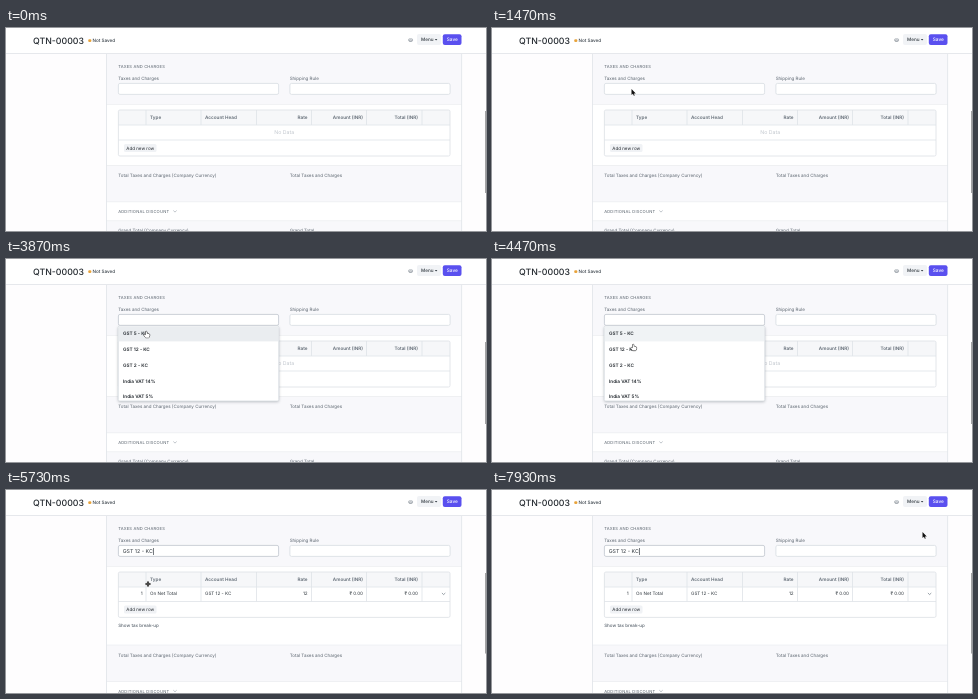
Animation, 480 px wide and 203 px high, one loop 8000 ms. Source, as an HTML page with a canvas:

```html
<!DOCTYPE html>
<html lang="en">
<head>
<meta charset="utf-8">
<title>Quotation taxes</title>
<style>
  html, body { margin: 0; width: 100%; height: 100%; overflow: hidden; background: #fff; }
  canvas { display: block; width: 480px; height: 203px; }
</style>
</head>
<body>
<canvas id="stage"></canvas>
<script>
const W = 480, H = 203, LOOP = 8000, STEP = 1000 / 15;
const canvas = document.getElementById('stage');
const ctx = canvas.getContext('2d');
const dpr = window.devicePixelRatio || 1;
canvas.width = W * dpr;
canvas.height = H * dpr;

const INK = '#20262c', LABEL = '#59636d', LINE = '#e3e6ea', SHADE = '#f8f8fb';
const COLUMNS = [140, 195, 250.5, 305.5, 360.5, 416];
const OPTIONS = ['GST 5 - KC', 'GST 12 - KC', 'GST 2 - KC', 'India VAT 14%', 'India VAT 5%'];

// Times in ms
const FOCUS = 2465, OPEN = 3065, HOVER = 4400, PICK = 5195, FILL = 5260, ROW = 5730;

// Pointer path: time, x, y of the hot spot
const PATH = [
  [65, 446, 11], [265, 437.5, 11.5], [600, 437.5, 11.5], [1465, 139.5, 61],
  [3535, 139.5, 61], [4200, 141, 83.5], [4400, 141, 83.5], [4665, 142, 94],
  [6135, 142, 94], [6600, 198, 106], [7000, 256, 110.5], [7270, 312, 113],
  [7600, 385, 86], [7865, 426.5, 46], [7930, 430.5, 42]
];
// Stretches that ease in and out, by index of their start
const EASED = [0, 2, 4, 6];

function rect(x, y, w, h, fill) {
  ctx.fillStyle = fill;
  ctx.fillRect(x, y, w, h);
}

function box(x, y, w, h, r, fill, stroke) {
  ctx.beginPath();
  ctx.roundRect(x, y, w, h, r);
  if (fill) { ctx.fillStyle = fill; ctx.fill(); }
  if (stroke) { ctx.strokeStyle = stroke; ctx.lineWidth = 0.8; ctx.stroke(); }
}

// y is the middle of the capitals
function text(str, x, y, { size = 4.5, weight = 400, color = LABEL, align = 'left', gap = 0 } = {}) {
  ctx.font = `${weight} ${size}px Inter, "Liberation Sans", sans-serif`;
  ctx.textRendering = 'geometricPrecision';
  ctx.letterSpacing = gap + 'px';
  ctx.textAlign = align;
  ctx.fillStyle = color;
  ctx.fillText(str, x, y + size * 0.364);
}

function polyline(points, color, width) {
  ctx.beginPath();
  points.forEach(([x, y]) => ctx.lineTo(x, y));
  ctx.strokeStyle = color;
  ctx.lineWidth = width;
  ctx.stroke();
}

const chevron = (x, y, color) => polyline([[x - 1.7, y - 0.8], [x, y + 0.8], [x + 1.7, y - 0.8]], color, 0.7);

function header() {
  rect(0, 0, W, 25, '#fff');
  rect(0, 25, W, 1, '#e6e8ec');
  text('QTN-00003', 27, 12.6, { size: 8.75, weight: 500, color: INK });
  box(82.2, 11.2, 3.2, 2.8, 1.3, '#e8a33a');
  text('Not Saved', 86.5, 12.5, { size: 4.6, weight: 500, color: '#333c44' });

  box(402.7, 10.9, 3.8, 2.2, 0.5, null, '#98a0a8');
  box(403.5, 12.1, 2.2, 1.4, 0.2, '#fff', '#98a0a8');

  box(411, 6, 24, 11, 2, '#f1f3f6');
  text('Menu', 415, 11.6, { size: 4.6, weight: 500, color: '#30383f' });
  ctx.beginPath();
  ctx.moveTo(428.8, 11);
  ctx.lineTo(431.4, 11);
  ctx.lineTo(430.1, 12.5);
  ctx.fill();
  box(436.8, 6.2, 18.7, 10.7, 2, '#5a50ef');
  text('Save', 446.3, 11.6, { size: 4.75, weight: 500, color: '#fff', align: 'center' });
}

function sections(shift) {
  rect(0, 26, W, H, '#fefdfe');
  rect(100, 26, 356, H, '#fff');
  rect(100, 26, 356, 50, SHADE);
  rect(100, 137 + shift, 356, 37, SHADE);
  rect(100, 192.5 + shift, 356, 20, SHADE);
  for (const y of [76, 137 + shift, 173.5 + shift, 192.5 + shift]) rect(100, y, 356, 0.7, '#ebedf0');
  rect(100, 26, 0.9, H, LINE);
  rect(455.2, 26, 0.9, H, LINE);

  const title = { size: 4.13, gap: 0.16 };
  text('TAXES AND CHARGES', 112.2, 38.5, title);
  text('Taxes and Charges', 112.2, 50.2);
  text('Shipping Rule', 283.7, 50.2);
  text('Total Taxes and Charges (Company Currency)', 112.2, 147.8 + shift);
  text('Total Taxes and Charges', 283.7, 147.8 + shift);
  text('ADDITIONAL DISCOUNT', 112.2, 183.6 + shift, title);
  chevron(169, 183.3 + shift, '#a5adb5');
  text('Grand Total (Company Currency)', 112.2, 202.5 + shift);
  text('Grand Total', 283.7, 202.5 + shift);
  rect(479, 83, 1, 82 - shift / 12, '#a3a3a5');
}

function fields(t) {
  const focused = t >= FOCUS;
  box(112.4, 55.4, 160.2, 11, 1.6, '#fff', focused ? '#c0c6ce' : '#d9dde2');
  box(283.9, 55.4, 160.2, 11, 1.6, '#fff', '#d9dde2');
  if (t >= FILL) text('GST 12 - KC', 116.7, 61.1, { size: 5.25, color: '#2b333a' });

  const hidden = (t >= 3600 && t < 3930) || (t >= 4465 && t < 4995);
  if (focused && !hidden) rect(t >= FILL ? 147.2 : 116.3, 58, 0.7, 7, '#3c434a');
}

function grid(filled) {
  const bottom = filled ? 127.4 : 128;
  const rowEnd = filled ? 111.4 : 112;
  box(112.4, 82, 331.6, bottom - 82, 1.5, '#fff');
  box(112.4, 82, 331.6, 15, [1.5, 1.5, 0, 0], '#f6f7f9');
  for (const x of COLUMNS) rect(x - 0.4, 82, 0.8, filled ? rowEnd - 82 : 15, '#dfe3e8');
  rect(112.4, 96.6, 331.6, 0.8, '#dfe3e8');
  rect(112.4, rowEnd - 0.4, 331.6, 0.8, '#dfe3e8');
  box(112.4, 82, 331.6, bottom - 82, 1.5, null, '#dce0e5');

  const head = { size: 4.65, weight: 600, color: '#616b75' }, headRight = { ...head, align: 'right' };
  text('Type', 144, 89.6, head);
  text('Account Head', 199, 89.6, head);
  text('Rate', 301.6, 89.6, headRight);
  text('Amount (INR)', 357, 89.6, headRight);
  text('Total (INR)', 412, 89.6, headRight);

  if (filled) {
    const cell = { size: 4.6, color: '#2b333a' }, cellRight = { ...cell, align: 'right' };
    text('1', 136.5, 103.8, cellRight);
    text('On Net Total', 144, 103.8, cell);
    text('GST 12 - KC', 199, 103.8, cell);
    text('12', 301.6, 103.8, cellRight);
    text('₹ 0.00', 357, 103.8, cellRight);
    text('₹ 0.00', 412, 103.8, cellRight);
    chevron(437.6, 103.8, '#6c7781');
    text('Show tax break-up', 112.2, 135.4, { weight: 500 });
  } else {
    text('No Data', 278.2, 104.5, { size: 5.25, color: '#c3c8cf', align: 'center' });
  }
  const y = bottom - 8;
  box(118, y - 4, 32.5, 8, 1.5, '#f0f2f5');
  text('Add new row', 120.3, y, { color: INK });
}

function dropdown(t) {
  ctx.save();
  ctx.shadowColor = 'rgba(30, 40, 50, 0.3)';
  ctx.shadowBlur = 3 * dpr;
  ctx.shadowOffsetY = dpr;
  box(112.2, 67, 160.6, 75, 1.5, '#fff');
  ctx.restore();
  box(112.2, 67, 160.6, 75, 1.5, null, '#d9dde2');

  ctx.save();
  ctx.beginPath();
  ctx.rect(112.6, 67.3, 159.8, 74.2);
  ctx.clip();
  rect(113, 67.4, 159, 15, t < HOVER ? '#eaedf0' : '#f0f3f5');
  if (t >= 4600) rect(113, 82.8, 159, 15.4, '#eaedf0');
  OPTIONS.forEach((name, i) => text(name, 117, 74.6 + i * 15.75, { size: 4.7, weight: 600, color: INK }));
  const fade = Math.max(0, Math.min(1, (3800 - t) / 200));
  ctx.globalAlpha = fade;
  box(268.6, 68, 2.6, 42, 1.3, '#808183');
  ctx.restore();
}

function pointerAt(t) {
  let i = PATH.length - 1;
  while (i > 0 && PATH[i][0] > t) i--;
  const a = PATH[i], b = PATH[i + 1] || a;
  let p = b === a ? 0 : (t - a[0]) / (b[0] - a[0]);
  if (EASED.includes(i)) p = p * p * (3 - 2 * p);
  const mix = k => a[k] + (b[k] - a[k]) * p;
  return [mix(1), mix(2)];
}

function outlined(path, fill, rim, width) {
  ctx.lineJoin = 'round';
  ctx.strokeStyle = rim;
  ctx.lineWidth = width;
  ctx.stroke(path);
  ctx.fillStyle = fill;
  ctx.fill(path);
}

const ARROW = new Path2D('M0 0V16L3.7 12.5 6.2 18 8.6 17 6.2 11.6H11.3Z');
const HAND = new Path2D('M-1.8 1.5Q0-1 1.8 1.5V7L4 6.5 5 8 7 7.5 8 9 10 9V14L7.5 19H-1.5L-6.5 12Q-6.5 9-4 10L-1.8 12Z');
const MOVE = new Path2D('M0-8L3.5-4H1.4V-1.4H4V-3.5L8 0 4 3.5V1.4H1.4V4H3.5L0 8-3.5 4H-1.4V1.4H-4V3.5L-8 0-4-3.5V-1.4H-1.4V-4H-3.5Z');
const BEAM = new Path2D('M-3.5-9H-1L0-8 1-9H3.5V-7.5H1.5L.8-6V6L1.5 7.5H3.5V9H1L0 8-1 9H-3.5V7.5H-1.5L-.8 6V-6L-1.5-7.5H-3.5Z');

function cursorKind(t) {
  if (t < 720) return 'hand';
  if (t < 2590) return 'arrow';
  if (t < 3800) return 'beam';
  if (t < 5460) return 'hand';
  if (t < ROW) return 'arrow';
  return t < 7130 ? 'move' : 'arrow';
}

function pointer(t) {
  if (t < 65) return;
  const [x, y] = pointerAt(t);
  const kind = cursorKind(t);
  const scale = kind === 'hand' ? 0.34 : 0.38;
  ctx.save();
  ctx.translate(x, y + (kind === 'beam' ? 0.8 : 0));
  ctx.scale(scale, scale);
  if (kind === 'hand') outlined(HAND, '#fff', '#111', 2.8);
  else if (kind === 'beam') outlined(BEAM, '#111', '#fff', 1.2);
  else outlined(kind === 'move' ? MOVE : ARROW, '#111', '#fff', 2.4);
  ctx.restore();
}

function draw(t) {
  const filled = t >= ROW;
  ctx.setTransform(dpr, 0, 0, dpr, 0, 0);
  sections(filled ? 17.7 : 0);
  fields(t);
  grid(filled);
  if (t >= OPEN && t < PICK) dropdown(t);
  header();
  pointer(t);
}

const start = performance.now();
function tick(now) {
  const t = Math.max(0, now - start) % LOOP;
  draw(Math.floor((t + 4) / STEP) * STEP);
  requestAnimationFrame(tick);
}
requestAnimationFrame(tick);
</script>
</body>
</html>
```
